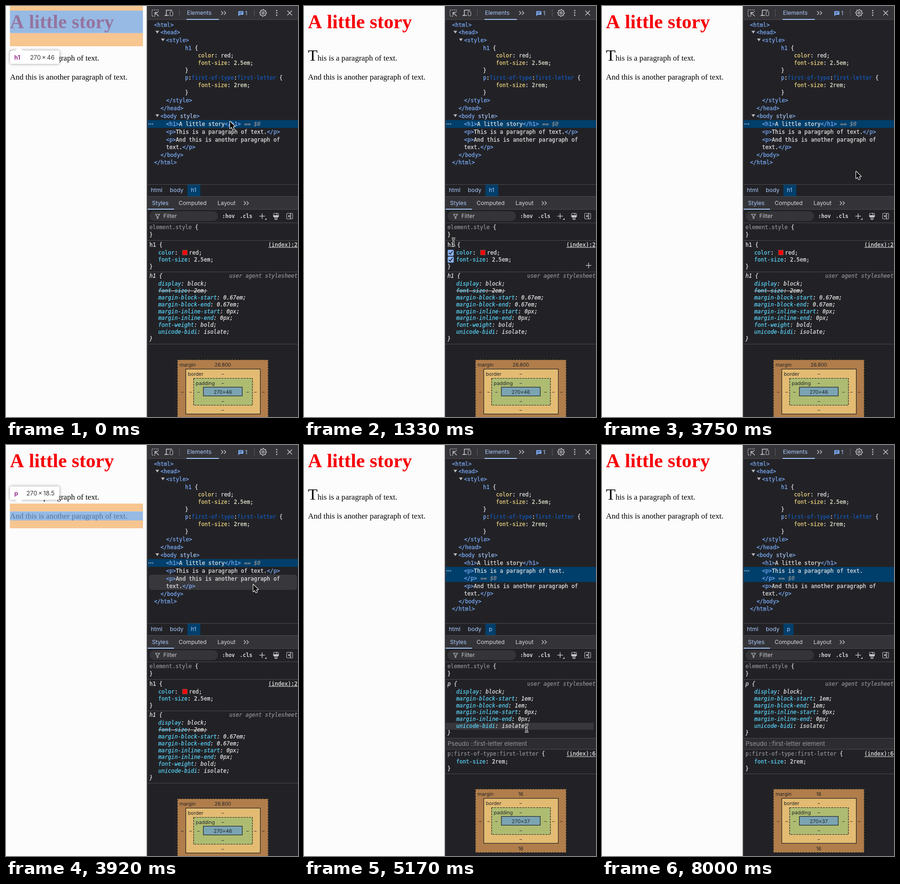
An HTML page with a canvas for the animation above (8.08 s loop, 631 by 888 pixels).

```html
<!DOCTYPE html>
<html lang="en">
<head>
<meta charset="utf-8">
<title>Inspecting a page</title>
<style>
html, body { margin: 0; width: 100%; height: 100%; overflow: hidden; background: #222226; }
canvas { display: block; width: 631px; height: 888px; }
</style>
</head>
<body>
<canvas id="stage"></canvas>
<script>
const W = 631, H = 888, LOOP = 8080, STEP = 1000 / 12;
const canvas = document.getElementById('stage');
const ctx = canvas.getContext('2d');
const dpr = window.devicePixelRatio || 1;
canvas.width = W * dpr;
canvas.height = H * dpr;

const MONO = '"DejaVu Sans Mono", monospace';
const UI = 'Inter, sans-serif';
const SERIF = '"Liberation Serif", serif';
const BG = '#222226', BAR = '#343438', LINE = '#4b4b50', SELECT = '#003f6b';
const ACCENT = '#a8c7fa', ICON = '#c9c9cc';
const INK = {
  b: '#7cacf8', w: '#e8e8e8', d: '#1559bd', y: '#f3d982', n: '#e6ead2',
  g: '#929296', a: '#a8c7fa', c: '#5cd5fb'
};
const CLICK = 4420;

// time, x, y of the pointer's hot spot
const PATH = [
  [170, 484, 250], [1000, 350, 468], [1080, 337, 492], [1330, 323, 510],
  [1500, 321, 513], [1670, 321, 513], [2000, 319, 516], [3170, 319, 516],
  [3750, 549, 358], [3920, 534, 301], [4080, 520, 276], [4250, 506, 272],
  [4830, 496, 276], [4920, 491, 377], [5170, 481, 615], [5670, 466, 667],
  [5830, 466, 667], [6170, 460, 665], [7250, 460, 665], [7500, 380, 640],
  [8000, -20, 500]
];

function pointerAt(t) {
  if (t <= PATH[0][0]) return { x: PATH[0][1], y: PATH[0][2] };
  const i = PATH.findIndex(p => p[0] >= t);
  if (i < 0) return { x: -20, y: 500 };
  const [t0, x0, y0] = PATH[i - 1], [t1, x1, y1] = PATH[i];
  const k = (t - t0) / (t1 - t0);
  return { x: x0 + (x1 - x0) * k, y: y0 + (y1 - y0) * k };
}

function rect(x, y, w, h, fill) {
  ctx.fillStyle = fill;
  ctx.fillRect(x, y, w, h);
}

function round(x, y, w, h, r, fill, stroke) {
  ctx.beginPath();
  ctx.roundRect(x, y, w, h, r);
  if (fill) { ctx.fillStyle = fill; ctx.fill(); }
  if (stroke) { ctx.strokeStyle = stroke; ctx.lineWidth = 1; ctx.stroke(); }
}

function poly(points, stroke, width = 1.3, fill, close) {
  ctx.beginPath();
  points.forEach(([x, y]) => ctx.lineTo(x, y));
  if (close) ctx.closePath();
  if (stroke) { ctx.strokeStyle = stroke; ctx.lineWidth = width; ctx.stroke(); }
  if (fill) { ctx.fillStyle = fill; ctx.fill(); }
}

function text(s, x, y, font, fill, align = 'left') {
  ctx.font = font;
  ctx.fillStyle = fill;
  ctx.textAlign = align;
  ctx.fillText(s, x, y);
}

const ui = (s, x, y, fill = '#d6d6d9', size = 12.3, align) =>
  text(s, x, y + 4.4, `${size}px ${UI}`, fill, align);

// Monospace text with slightly thickened strokes.
function mono(s, x, y, style, fill, align) {
  text(s, x, y + 4, `${style} 11.68px ${MONO}`, fill, align);
  ctx.strokeStyle = fill;
  ctx.lineWidth = 0.25;
  ctx.strokeText(s, x, y + 4);
}

// Coloured runs: each part between bars starts with an INK key.
function code(runs, x, y, style = '') {
  const start = x;
  for (const run of runs.split('|')) {
    const it = run[0] === 'g' && run.includes('$0') ? 'italic' : style;
    mono(run.slice(1), x, y, it, INK[run[0]]);
    x += ctx.measureText(run.slice(1)).width;
  }
  return x - start;
}

function treeRows(picked) {
  const rows = [
    ['', 320, 'b<html>'], ['', 334, 'b<head>', 1], ['', 346, 'b<style>', 1],
    ['', 387, 'bh1 |w{'], ['+', 415, 'ycolor|w: red;'],
    ['+', 415, 'yfont-size|w: |n2.5em|w;'], ['+', 387, 'w}'],
    ['+', 387, 'bp|w:|dfirst-of-type|w:|dfirst-letter|w {'],
    ['+', 415, 'yfont-size|w: |n2rem|w;'], ['+', 387, 'w}'],
    ['', 346, 'b</style>'], ['', 334, 'b</head>'], ['', 334, 'b<body |astyle|b>', 1],
    ['h1', 346, 'b<h1>|wA little story|b</h1>' + (picked ? '' : '|g == $0')]
  ];
  if (picked) {
    rows.push(['p1', 346, 'b<p>|wThis is a paragraph of text.'], ['+p1', 346, 'b</p>|g == $0']);
  } else {
    rows.push(['p1', 346, 'b<p>|wThis is a paragraph of text.|b</p>']);
  }
  rows.push(['p2', 346, 'b<p>|wAnd this is another paragraph of'], ['+p2', 346, 'wtext.|b</p>'],
    ['body', 334, 'b</body>'], ['', 320, 'b</html>']);
  let y = 23.6;
  return rows.map(([id, x, runs, open]) => {
    y += id[0] === '+' ? 16 : 16.9;
    return { id: id.replace('+', ''), x, y, runs, open };
  });
}

function drawTree(rows, hover, selected) {
  const span = id => {
    const own = rows.filter(r => r.id === id);
    return [own[0].y - 8.4, own[own.length - 1].y + 8.4];
  };
  if (hover && hover !== selected) {
    const [a, b] = span(hover);
    round(309, a, 320, b - a, 5, '#38383c');
  }
  const [top, bottom] = span(selected);
  rect(306, top, 325, bottom - top, SELECT);
  for (let i = 0; i < 3; i++) rect(308 + i * 4, top + 7.5, 2, 2, '#b5cde0');
  for (const r of rows) {
    code(r.runs, r.x, r.y);
    if (r.open) {
      const x = r.x - 7, y = r.y - 1;
      poly([[x - 4, y - 3], [x + 4, y - 3], [x, y + 3]], null, 0, '#b9b9bd', true);
    }
  }
}

const chevrons = (x, y) => [0, 6].forEach(d =>
  poly([[x - 6 + d, y - 4], [x - 2 + d, y], [x - 6 + d, y + 4]], ICON, 1.4));

const plus = (x, y, r) => {
  poly([[x - r, y], [x + r, y]], ICON, 1.4);
  poly([[x, y - r], [x, y + r]], ICON, 1.4);
};

function drawToolbar() {
  rect(305, 0, 326, 29, BAR);
  rect(305, 29, 326, 1, LINE);
  ctx.setLineDash([2, 2]);
  poly([[322, 22], [315.5, 22], [315.5, 8.5], [329, 8.5], [329, 13]], ICON, 1.5);
  ctx.setLineDash([]);
  poly([[330, 22], [322, 14]], ICON, 1.6);
  poly([[322, 20], [322, 14], [328, 14]], ICON, 1.6);
  poly([[359, 9], [346.5, 9], [346.5, 19], [344, 20.5], [352, 20.5]], ICON, 1.5);
  round(354.5, 12, 6, 9, 1, null, ICON);
  rect(374, 7, 1, 16, '#5d5d62');
  ui('Elements', 391, 15, ACCENT);
  rect(390, 28, 70, 2, ACCENT);
  chevrons(471, 15);
  round(502, 11, 11, 8, 1, '#7cacf8');
  poly([[502, 17], [502, 22], [506, 18]], null, 0, '#7cacf8', true);
  rect(504, 13, 7, 1, BAR);
  rect(504, 15.5, 5, 1, BAR);
  ui('1', 516.5, 15.5, ACCENT);
  rect(536, 7, 1, 16, '#5d5d62');
  const gear = [];
  for (let i = 0; i < 32; i++) {
    const a = i * Math.PI / 16, r = i % 4 < 2 ? 7.4 : 5.6;
    gear.push([555.5 + r * Math.cos(a), 15 + r * Math.sin(a)]);
  }
  poly(gear, ICON, 1.4, null, true);
  ctx.beginPath();
  ctx.arc(555.5, 15, 2.2, 0, 7);
  ctx.stroke();
  for (let i = -1; i < 2; i++) {
    ctx.beginPath();
    ctx.arc(585, 15 + i * 5, 1.4, 0, 7);
    ctx.fillStyle = ICON;
    ctx.fill();
  }
  poly([[608, 10], [618, 20]], ICON, 1.5);
  poly([[618, 10], [608, 20]], ICON, 1.5);
}

function drawPaneBars(name) {
  rect(305, 385, 326, 1, LINE);
  rect(392, 386, name === 'h1' ? 28 : 22, 25, SELECT);
  ui('html', 313, 398, ACCENT);
  ui('body', 354, 398, ACCENT);
  ui(name, 399.5, 398, ACCENT);
  rect(305, 411, 326, 28, BAR);
  rect(305, 411, 326, 1, LINE);
  rect(305, 439, 326, 1, LINE);
  ui('Styles', 315.5, 425.5, ACCENT);
  rect(306, 438, 57, 2, ACCENT);
  ui('Computed', 373, 425.5);
  ui('Layout', 457, 425.5);
  chevrons(520, 426);
  round(310, 443.5, 148, 21, 10.5, '#353539');
  poly([[323, 450], [332, 450], [328.5, 455], [328.5, 459], [326.5, 459], [326.5, 455]], ICON, 1.1, null, true);
  ui('Filter', 340, 454, '#c9c9cc');
  const bold = `bold 11.4px ${MONO}`;
  text(':hov', 467, 458, bold, '#d6d6d9');
  text('.cls', 505, 458, bold, '#d6d6d9');
  plus(553.5, 454, 6);
  poly([[563, 458], [563, 462], [559, 462]], null, 0, ICON, true);
  round(578, 448, 11, 8, 1, null, ICON);
  rect(578, 452, 11, 4, ICON);
  poly([[581.5, 456], [581.5, 461], [585.5, 461], [585.5, 456]], ICON, 1.5);
  poly([[585, 448], [585, 451]], ICON, 1.5);
  round(606.5, 448, 13, 12, 1, null, ICON);
  poly([[615, 448], [615, 460]], ICON, 1.5);
  poly([[613, 451], [609, 454], [613, 457]], null, 0, ICON, true);
  rect(305, 468, 326, 1, LINE);
}

function origin(label, y, agent) {
  mono(label, 630, y, agent ? 'italic' : '', agent ? INK.g : INK.w, 'right');
  if (!agent) rect(567, y + 5.5, 63, 1, INK.w);
}

function declare(prop, value, y, style) {
  const w = code(`c${prop}|w: `, 329, y, style);
  if (value === 'red') {
    rect(381, y - 5.5, 11, 11, '#a05050');
    rect(382, y - 4.5, 9, 9, '#f00');
    code('wred;', 395.5, y);
  } else {
    code(`w${value};`, 329 + w, y, style);
  }
}

function agentRule(name, props, y, ptr) {
  code(`w${name} {`, 310, y, 'italic');
  origin('user agent stylesheet', y, true);
  props.forEach(([prop, value], i) => {
    const row = y + 16.9 + i * 14.85;
    const near = ptr.x > 305 && Math.abs(ptr.y - 6 - row) < 7.4;
    if (near) rect(305, row - 7, 321, 15, '#38383c');
    declare(prop, value, row, 'italic');
    if (value === '2em') rect(329, row, 106, 1, INK.w);
  });
  const end = y + 16.9 + props.length * 14.85;
  code('w}', 310, end, 'italic');
  rect(305, Math.round(end + 11), 326, 1, LINE);
}

function tick(y) {
  round(310.5, y - 6, 13, 13, 2, '#8ab4f8');
  poly([[313, y + 0.5], [316, y + 3.5], [321, y - 3]], '#202124', 1.8);
}

function authorRule(runs, index, props, y, hover) {
  code(runs, 310, y);
  origin(`(index):${index}`, y);
  props.forEach(([prop, value], i) => {
    const row = y + 17 + i * 14.9;
    declare(prop, value, row);
    if (hover) tick(row);
  });
  const end = y + 17 + props.length * 14.9;
  code('w}', 310, end);
  if (hover) plus(615, end - 2, 6);
  rect(305, Math.round(end + 11), 326, 1, LINE);
}

const inside = (p, top, bottom) => p.x > 305 && p.y >= top && p.y < bottom;

function drawStyles(picked, ptr) {
  code('gelement.style |w{', 310, 478);
  code('w}', 310, 494);
  rect(305, 506, 326, 1, LINE);
  const margins = v => [['margin-block-start', v], ['margin-block-end', v],
    ['margin-inline-start', '0px'], ['margin-inline-end', '0px']];
  const bidi = ['unicode-bidi', 'isolate'];
  if (!picked) {
    authorRule('wh1 {', 2, [['color', 'red'], ['font-size', '2.5em']], 515.7, inside(ptr, 507, 574));
    agentRule('h1', [['display', 'block'], ['font-size', '2em'], ...margins('0.67em'),
      ['font-weight', 'bold'], bidi], 583.3, ptr);
  } else {
    agentRule('p', [['display', 'block'], ...margins('1em'), bidi], 516, ptr);
    rect(305, 634, 326, 23, '#2d2d31');
    ui('Pseudo ::first-letter element', 310.5, 646, '#97979b', 13);
    rect(305, 657, 326, 1, LINE);
    authorRule('gp:first-of-type:first-letter |w{', 6, [['font-size', '2rem']], 667.4, inside(ptr, 658, 710));
  }
}

function drawBoxModel(y, margin, size) {
  const frames = [
    ['#b07d4b', 370, 0, 197, 138, 'margin', true], ['#e3bb72', 388, 20, 162, 98, 'border', false],
    ['#aebc72', 405, 40, 128, 59, 'padding', true], ['#7ba4b3', 426, 59, 85, 20, '', false]
  ];
  const label = (s, x, dy) => ui(s, x, y + dy, '#242426', 10.7, 'center');
  frames.forEach(([fill, x, dy, w, h, name, dashed]) => {
    rect(x, y + dy, w, h, fill);
    ctx.setLineDash(dashed ? [4, 2] : []);
    ctx.strokeStyle = '#1f1f21';
    ctx.lineWidth = 1.2;
    ctx.strokeRect(x + 0.5, y + dy + 0.5, w - 1, h - 1);
    ctx.setLineDash([]);
    if (!name) return;
    ui(name, x + 5, y + dy + 10.5, '#242426', 10.7);
    const value = name === 'margin' ? margin : '–';
    label(value, 468.5, dy + 10.5);
    label(value, 468.5, dy + h - 9.5);
    label('–', x + 11, 69.5);
    label('–', x + w - 11, 69.5);
  });
  label(size, 468.5, 69.5);
}

function drawPage() {
  rect(0, 0, 304, H, '#fcfcfc');
  text('A little story', 8.5, 48, `bold 42.2px ${SERIF}`, '#f70006');
  text('T', 8.5, 118, `34.1px ${SERIF}`, '#000');
  text('his is a paragraph of text.', 29.3, 118, `17.05px ${SERIF}`, '#000');
  text('And this is another paragraph of text.', 8.5, 159, `17.05px ${SERIF}`, '#000');
}

// margin top, content top, content bottom, margin bottom, label top
const BOXES = {
  h1: [0, 10, 58.5, 87, 96, 'h1', '270 × 46'],
  p1: [70, 87, 126.5, 143.5, 33, 'p', '270 × 37'],
  p2: [126.5, 143.5, 163, 180, 89.5, 'p', '270 × 18.5'],
  body: [10, 10, 163, 163, 172, 'body', '270 × 144']
};

function drawOverlay(id) {
  const [m0, c0, c1, m1, top, tag, size] = BOXES[id];
  const sand = 'rgba(246,178,107,.74)';
  rect(8.5, m0, 287.5, c0 - m0, sand);
  rect(8.5, c1, 287.5, m1 - c1, sand);
  rect(8.5, c0, 287.5, c1 - c0, 'rgba(111,161,220,.72)');
  if (id === 'body') {
    rect(0, c0, 8.5, c1 - c0, sand);
    rect(296, c0, 8.5, c1 - c0, sand);
  }
  ctx.save();
  ctx.shadowColor = 'rgba(0,0,0,.4)';
  ctx.shadowBlur = 6 * dpr;
  round(8.5, top, 107, 29, 4, '#fff');
  ctx.restore();
  const edge = top > m1 ? top : top + 29;
  poly([[20, edge], [28, edge + (top > m1 ? -8 : 8)], [36, edge]], null, 0, '#fff', true);
  text(tag, 18, top + 19.5, `600 12.6px ${UI}`, '#881280');
  // thin spaces around the sign
  ui(size.replace(/ /g, '\u2009'), 105, top + 15.2, '#35353a', 13, 'right');
}

function drawHint(label, y, tipX) {
  poly([[tipX - 6, y + 26], [tipX, y + 32], [tipX + 6, y + 26]], null, 0, '#68686c', true);
  round(305.5, y, 123, 26.5, 4, '#29292d', '#68686c');
  ui(label, 313, y + 13.5, '#e8e8e8', 12.45);
}

function drawPointer({ x, y }) {
  ctx.lineJoin = 'round';
  if (x > 305 && y > 470) {
    const bar = [[[-4, -8], [-1.5, -8], [0, -6], [1.5, -8], [4, -8]], [[0, -6], [0, 6]],
      [[-4, 8], [-1.5, 8], [0, 6], [1.5, 8], [4, 8]], [[-2.5, 2], [2.5, 2]]];
    for (const [color, width] of [['#fff', 3.4], ['#111', 1.4]]) {
      bar.forEach(part => poly(part.map(([a, b]) => [x + a, y + b]), color, width));
    }
  } else {
    const shape = [[0, 0], [0, 15], [3.5, 11.8], [5.8, 17.2], [8.4, 16.1], [6.2, 10.8], [10.8, 10.7]];
    poly(shape.map(([a, b]) => [x + a, y + b - 0.5]), '#fff', 2.2, '#0a0a0a', true);
  }
  ctx.lineJoin = 'miter';
}

function draw(t) {
  const ptr = pointerAt(t);
  const picked = t >= CLICK;
  const rows = treeRows(picked);
  const hit = ptr.x > 305 && ptr.y < 385 && rows.find(r => Math.abs(ptr.y - r.y) <= 8.45);
  const hover = hit && BOXES[hit.id] ? hit.id : '';

  ctx.setTransform(dpr, 0, 0, dpr, 0, 0);
  rect(0, 0, W, H, BG);
  drawPage();
  drawToolbar();
  drawTree(rows, hover, picked ? 'p1' : 'h1');
  drawPaneBars(picked ? 'p' : 'h1');
  drawStyles(picked, ptr);
  if (picked) drawBoxModel(743, '16', '270×37');
  else drawBoxModel(764, '26.800', '270×46');
  rect(304, 0, 2, H, '#48484c');

  const onH1 = t >= 1740 && t < 3240, onP = t >= 5900 && t < 7320;
  const shown = onH1 ? 'h1' : onP ? 'p1' : hover;
  if (shown) drawOverlay(shown);
  if (onH1 && t >= 1900) drawHint('Specificity: (0,0,1)', 474, 317);
  if (onP && t >= 6070) drawHint('Specificity: (0,2,1)', 625.5, 363);
  drawPointer(ptr);
}

function tickFrame() {
  const t = performance.now() % LOOP;
  draw(Math.floor((t + 3.4) / STEP) * STEP);
  requestAnimationFrame(tickFrame);
}
tickFrame();
</script>
</body>
</html>
```
